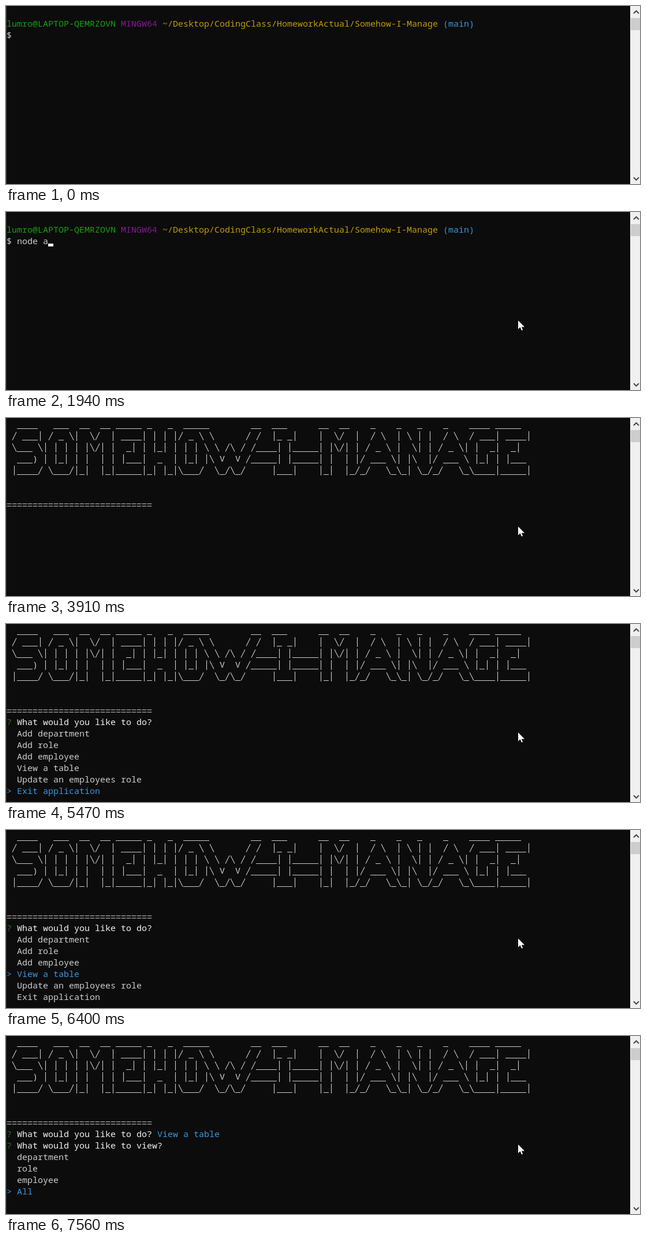
An HTML page for the animation above (8 s loop, 1098 px wide and 310 px high).

```html
<!DOCTYPE html>
<html lang="en">
<head>
<meta charset="utf-8">
<title>Terminal session</title>
<style>
  html, body { margin: 0; width: 100%; height: 100%; overflow: hidden; background: #0c0c0c; }
  svg { display: block; }
  text { font: 15px "Noto Sans Mono", monospace; font-kerning: none; white-space: pre; fill: #ccc; }
  .user { fill: #13a10e; }
  .system { fill: #881798; }
  .path { fill: #c19c00; }
  .blue { fill: #3a96dd; }
  .bright { fill: #f2f2f2; }
  .mark { fill: #327320; }
  .hint { fill: #767676; }
  .art { fill: none; stroke: #ccc; stroke-width: 1.1; }

  #edge { animation: edge 8s step-end infinite; }
  @keyframes edge { 0% { fill: #484848; } 6.625% { fill: #2c2c2c; } }
</style>
</head>
<body>
<svg width="1098" height="310" viewBox="0 0 1098 310">
  <rect width="1098" height="310" fill="#0c0c0c"/>
  <rect id="edge" width="1" height="310"/>
  <g id="screen"></g>
  <rect x="1081" width="17" height="310" fill="#f0f0f0"/>
  <rect x="1082" y="21" width="16" height="21" fill="#cdcdcd"/>
  <path d="M1087 13l4.5-4.5 4.5 4.5M1087 298.5l4.5 4.5 4.5-4.5" fill="none" stroke="#4d4249" stroke-width="2"/>
  <circle id="click" cx="886" cy="187" r="15" fill="#ff0" fill-opacity=".47"/>
  <path id="pointer" d="M0 0V15L3.5 11.8 6 17.3 8 16.5 5.8 11.2H11Z" fill="#fff"/>
</svg>
<script>
const LOOP = 8000, CELL = 9, ROW = 20, LEFT = 1, BASELINE = 16;
const $ = id => document.getElementById(id);

const banner = String.raw`
  ____   ___  __  __ _____ _   _  _____        __  ___      __  __    _    _   _    _    ____ _____
 / ___| / _ \|  \/  | ____| | | |/ _ \ \      / /  |_ _|    |  \/  |  / \  | \ | |  / \  / ___| ____|
 \___ \| | | | |\/| |  _| | |_| | | | \ \ /\ / /____| |_____| |\/| | / _ \ |  \| | / _ \| |  _|  _|
  ___) | |_| | |  | | |___|  _  | |_| |\ V  V /_____| |_____| |  | |/ ___ \| |\  |/ ___ \ |_| | |___
 |____/ \___/|_|  |_|_____|_| |_|\___/  \_/\_/     |___|    |_|  |_/_/   \_\_| \_/_/   \_\____|_____|


${"=".repeat(28)}`.split("\n").slice(1);

// Line-art characters as pen moves from the top left of their cell
const strokes = {
  "|": "m4.5 3v17",
  "/": "m8 4.5l-7 14",
  "\\": "m1 4.5l7 14",
  "_": "m0 18.5h9",
  "=": "m.7 9.5h7.6m-7.6 4h7.6"
};

const span = (name, text) => `<tspan class="${name}">${text}</tspan>`;

const draw = (lines, firstRow = 0) => lines.map((line, i) => line &&
  `<text x="${LEFT}" y="${(firstRow + i) * ROW + BASELINE}">${line}</text>`).join("");

function drawArt(lines) {
  const pen = lines.flatMap((line, row) => [...line].map((char, col) =>
    strokes[char] ? `M${LEFT + col * CELL} ${row * ROW}${strokes[char]}` : ""));
  const letters = lines.map(line => line.replace(/[|\/\\_=]/g, " "));
  return `<path class="art" d="${pen.join("")}"/>` + draw(letters);
}

const caret = (col, row) =>
  `<rect class="bright" x="${LEFT + col * CELL}" y="${row * ROW + 15}" width="${CELL}" height="5"/>`;

const prompt = [
  span("user", "lumro@LAPTOP-QEMRZOVN"),
  span("system", "MINGW64"),
  span("path", "~/Desktop/CodingClass/HomeworkActual/Somehow-I-Manage"),
  span("blue", "(main)")
].join(" ");

const shell = (typed, col, row = 2) =>
  draw(["", prompt, "$ " + typed]) + (col === undefined ? "" : caret(col, row));

const typing = typed => shell(typed, 2 + typed.length);

const question = (text, rest = "") => span("mark", "?") + " " + span("bright", text) + rest;

const choices = (items, selected) => items.map((item, i) =>
  i === selected ? span("blue", "&gt; " + item) : "  " + item);

const title = drawArt(banner);
const app = (...lines) => title + draw(lines, banner.length);

const ASK_TASK = "What would you like to do?";
const tasks = ["Add department", "Add role", "Add employee", "View a table",
  "Update an employees role", "Exit application"];
const tables = ["department", "role", "employee", "All"];

const taskMenu = selected => app(question(ASK_TASK), ...choices(tasks, selected));

const tableMenu = (selected, hint = "") => app(
  question(ASK_TASK, " " + span("blue", "View a table")),
  question("What would you like to view?", span("hint", hint)),
  ...choices(tables, selected));

const scenes = [
  [0, shell("")],
  [1080, shell("", 2)],
  [1150, typing("n")],
  [1320, typing("no")],
  [1400, typing("nod")],
  [1550, typing("node")],
  [1720, typing("node ")],
  [1940, typing("node a")],
  [2260, typing("node ap")],
  [2580, typing("node app.js ")],
  [3040, shell("node app.js", 0, 3)],
  [3740, shell("node app.js")],
  [3910, app()],
  [5470, taskMenu(5)],
  [6150, taskMenu(4)],
  [6320, app()],
  [6400, taskMenu(3)],
  [7010, tableMenu(0, " (Use arrow keys)")],
  [7560, tableMenu(3)]
];

// Pointer tip: [time, x, y]
const pointerStops = [[0, 1100, 320], [70, 1016, 289], [147, 968, 252], [223, 914, 209], [300, 887, 189]];

const at = (list, t) => list.findLast(item => item[0] <= t);

let shown;
function render(now) {
  const t = now % LOOP;
  const scene = at(scenes, t);
  if (scene !== shown) {
    $("screen").innerHTML = scene[1];
    shown = scene;
  }
  const [, x, y] = at(pointerStops, t);
  $("pointer").setAttribute("transform", `translate(${x} ${y})`);
  $("pointer").style.display = t < 70 ? "none" : "";
  $("click").style.display = t >= 530 && t < 760 ? "" : "none";
}

const start = performance.now();
function tick() {
  render(performance.now() - start);
  requestAnimationFrame(tick);
}
tick();
</script>
</body>
</html>
```
